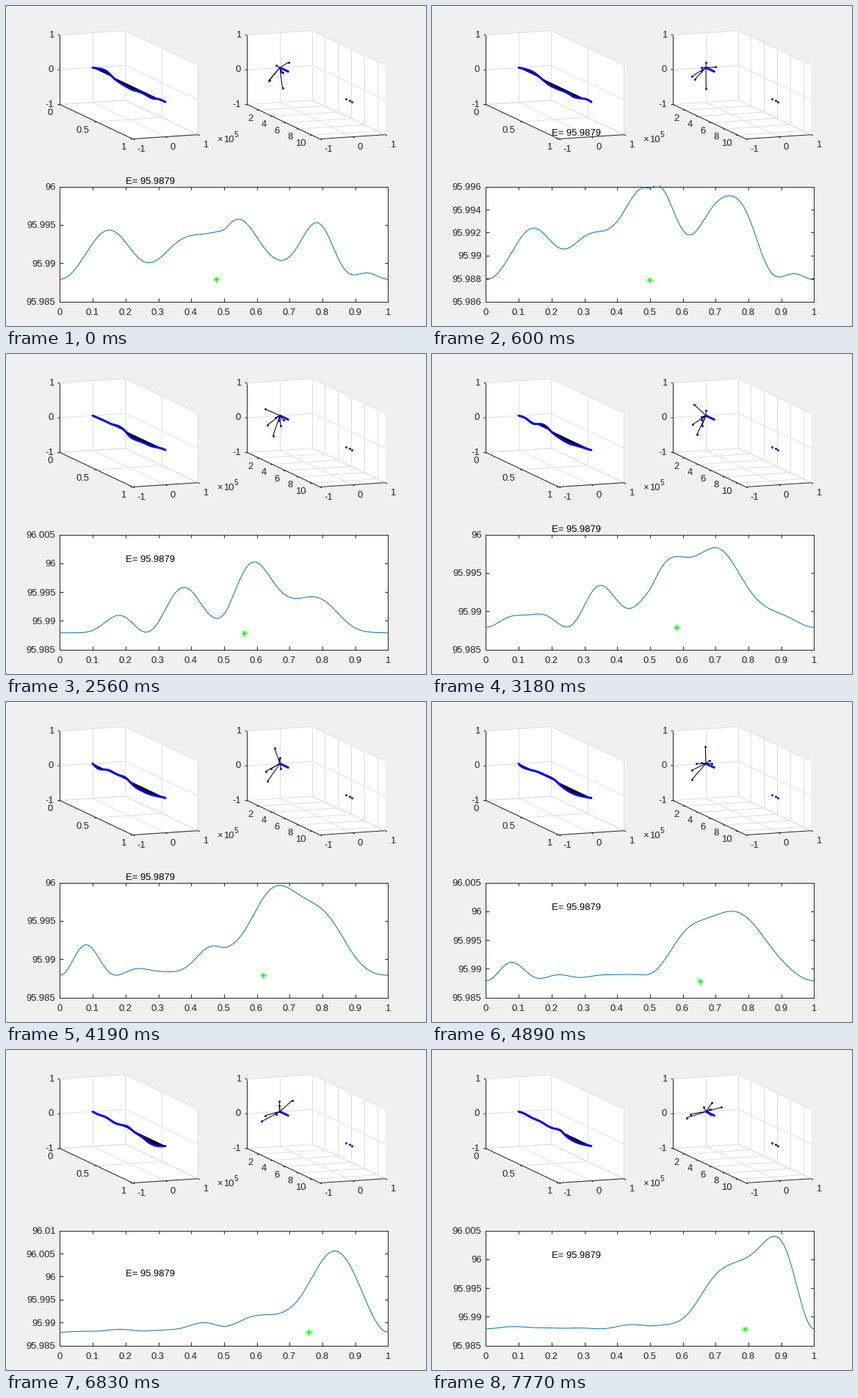
These frames come from a looping animation (572 px wide and 437 px high, 8550 ms). A matplotlib script:

```python
import numpy as np
import matplotlib.pyplot as plt
from matplotlib.animation import FuncAnimation
from matplotlib.collections import LineCollection
from matplotlib.patches import Polygon, Rectangle

W, H, DPI = 572, 437, 100
PX = 72 / DPI
LOOP, STEP = 8550, 30
DARK, GRID, BLUE = "#262626", "#dfdfdf", "#0000ff"

# Moments (ms) at which the picture advances by one simulation step
TIMES = [0, 290, 600, 910, 1220, 1540, 1850, 2240, 2560, 2870, 3180, 3490, 3880,
         4190, 4500, 4890, 5200, 5510, 5820, 6130, 6450, 6830, 7140, 7450, 7770]
# Upper y limit of the lower plot, from the given step on
TOPS = [(0, 96), (2, 95.996), (3, 96), (5, 96.005), (9, 96),
        (14, 96.005), (21, 96.01), (24, 96.005)]

# Particle in a box with a narrow central barrier: wave numbers, weights, phases
K = np.array([1.404, 2, 3.199, 4, 6, 7.093, 8])
AMP = np.array([.464, .605, .49, .3, .14, .17, .145])
PHASE = np.array([227, -82.4, 226, 27, 150, -61, -71])
SIGN = np.array([1, -1, -1, 1, -1, -1, 1])
RATE = .874 * K ** 2
ENERGY, DENSITY = 95.9879, .00415

x = np.linspace(0, 1, 251)
kpi = K[:, None] * np.pi
# Even modes have a node at the barrier; the others bend there
path = np.where(K[:, None] % 2 == 0, x, .5 - np.hypot(x - .5, .012))
modes = SIGN[:, None] * np.sin(kpi * path) * np.sqrt(2 / (1 - np.sin(kpi) / kpi))

# Lower plot area
L, R, T, B = 73, 520, 246, 403


def project(f, y, z, ox):
    """Box coordinates (f in 0..1, y and z in -1..1) to pixels."""
    return np.stack(np.broadcast_arrays(
        73 + ox + 99 * f + 44.5 * (y + 1),
        134 + 47 * f - 2.9 * (y + 1) - 47.5 * (z + 1)), -1)


fig = plt.figure(figsize=(W / DPI, H / DPI), dpi=DPI, facecolor="#f0f0f0")
ax = fig.add_axes([0, 0, 1, 1])
# Whole numbers are pixel centres, nudged so that snapping keeps the pixel
ax.set_xlim(-.49, W - .49)
ax.set_ylim(H - .51, -.51)
ax.axis("off")


def label(px, py, s, ha="center", color=DARK, size=13):
    return ax.text(px - .7, py + 4, s, ha=ha, va="baseline", color=color,
                   fontsize=size * PX, family="Liberation Sans", zorder=9)


def lines(segs, color, z):
    art = LineCollection(segs, colors=color, linewidths=PX, zorder=z)
    ax.add_collection(art)
    return art


def curve(color, width, z, **kw):
    return ax.plot([], [], color=color, lw=width * PX, zorder=z, **kw)[0]


def dots(z=7):
    return curve(BLUE, 0, z, marker="o", ms=3 * PX, mew=0)


def box3d(ox, ticks, gap):
    """Walls, grid, axes and labels of one 3D plot."""
    def seg(a, b):
        return [project(*a, ox), project(*b, ox)]

    outline = [(0, -1, -1), (0, -1, 1), (0, 1, 1), (1, 1, 1), (1, 1, -1), (1, -1, -1)]
    ax.add_patch(Polygon([project(*p, ox) for p in outline], fc="white", lw=0, zorder=1))
    grid, axes = [], []
    for v in (-1, 0, 1):
        grid += [seg((0, v, -1), (0, v, 1)), seg((0, v, -1), (1, v, -1)),
                 seg((0, -1, v), (0, 1, v)), seg((0, 1, v), (1, 1, v))]
        zx, zy = project(0, -1, v, ox)
        axes.append([(zx, zy), (zx - 3, zy + .2)])
        label(zx - 8, zy - 1, str(v), "right")
        yx, yy = project(1, v, -1, ox)
        axes.append([(yx, yy), (yx + 2.7, yy + 1.3)])
        label(yx + 7, yy + 13, str(v), "left")
    for f, s in ticks:
        grid += [seg((f, -1, -1), (f, 1, -1)), seg((f, 1, -1), (f, 1, 1))]
        tx, ty = project(f, -1, -1, ox)
        axes.append([(tx, ty), (tx - 3, ty + .2)])
        label(tx - gap, ty + 10.5, s, "right")
    axes += [seg((0, -1, -1), (0, -1, 1)), seg((0, -1, -1), (1, -1, -1)),
             seg((1, -1, -1), (1, 1, -1))]
    lines(grid, GRID, 2)
    lines(axes, DARK, 3)


OX = 255
box3d(0, [(0, "0"), (.5, "0.5"), (1, "1")], 9)
box3d(OX, [((v - .2) / 11, str(v)) for v in range(2, 11, 2)], 7)
label(287, 181, "×", "left")
label(296, 181, "10", "left")
label(311, 174, "5", "left", size=10.4)

# Wave in space
base = project(x, 0, 0, 0)
fill = Polygon(base, fc="black", ec="black", lw=.5 * PX, zorder=5)
ax.add_patch(fill)
string = curve(BLUE, 3, 6, solid_capstyle="round")

# Spectrum
origin = project(0, 0, 0, OX)
stems = lines([], "black", 5)
tips = dots()
tail = project(np.array([0, .115]), 0, 0, OX)
curve(BLUE, 3, 6, solid_capstyle="round").set_data(*tail.T)
dots().set_data(*project(np.array([.914, .955, .995]), 0, 0, OX).T)

# Density plot
ax.add_patch(Rectangle((L, T), R - L, B - T, fc="white", lw=0, zorder=1))
frame_box = [[(L, T), (R, T), (R, B), (L, B), (L, T)]]
for i in range(11):
    tx = L + (R - L) * i / 10
    frame_box += [[(tx, B), (tx, B - 4.5)], [(tx, T), (tx, T + 4.5)]]
    label(tx, 417.5, f"{i / 10:g}")
lines(frame_box, DARK, 4)
yticks = lines([], DARK, 4)
ylabels = [label(67.7, 0, "", "right") for _ in range(6)]
density = curve("#0072bd", 1, 5)
density.set_clip_path(Rectangle((L, T - 1), R - L, B - T + 2, transform=ax.transData))
star = [curve("#00ff00", 0, 6, marker=m, ms=s * PX, mew=PX) for m, s in (("+", 9), ("x", 6))]
energy = label(163, 0, f"E= {ENERGY}", "left", "black")


def number(v):
    return f"{v:.3f}".rstrip("0").rstrip(".")


def update(i):
    now = i * STEP + STEP - 1
    k = int(np.searchsorted(TIMES, now, side="right")) - 1
    coef = AMP * np.exp(1j * np.radians(PHASE - RATE * k))
    psi = coef @ modes
    prob = np.abs(psi) ** 2

    amp = psi * np.sqrt(DENSITY)
    pts = project(x, amp.real, amp.imag, 0)
    string.set_data(*pts.T)
    fill.set_xy(np.vstack([pts, base[::-1]]))

    ends = project(0, coef.real, coef.imag, OX)
    stems.set_segments([[origin, p] for p in ends])
    tips.set_data(*ends.T)

    top = [v for start, v in TOPS if start <= k][-1]
    low, step = (95.986, .002) if top < 96 else (95.985, .005)

    def to_y(v):
        return T + (B - T) * (top - v) / (top - low)

    ticks = low + step * np.arange(round((top - low) / step) + 1)
    segs = []
    for v in ticks:
        ty = to_y(v)
        segs += [[(L, ty), (L + 4.5, ty)], [(R, ty), (R - 4.5, ty)]]
    yticks.set_segments(segs)
    for j, text in enumerate(ylabels):
        shown = j < len(ticks)
        text.set_text(number(ticks[j]) if shown else "")
        if shown:
            text.set_y(to_y(ticks[j]) + 4.6)

    density.set_data(L + (R - L) * x, to_y(ENERGY + DENSITY * prob))
    mean = (x * prob).sum() / prob.sum()
    for mark in star:
        mark.set_data([L + (R - L) * mean], [to_y(ENERGY)])
    energy.set_y(to_y(96.00068) + 4)
    return []


anim = FuncAnimation(fig, update, frames=LOOP // STEP, interval=STEP,
                     init_func=lambda: update(0), repeat=True, repeat_delay=0)
plt.show()
```
